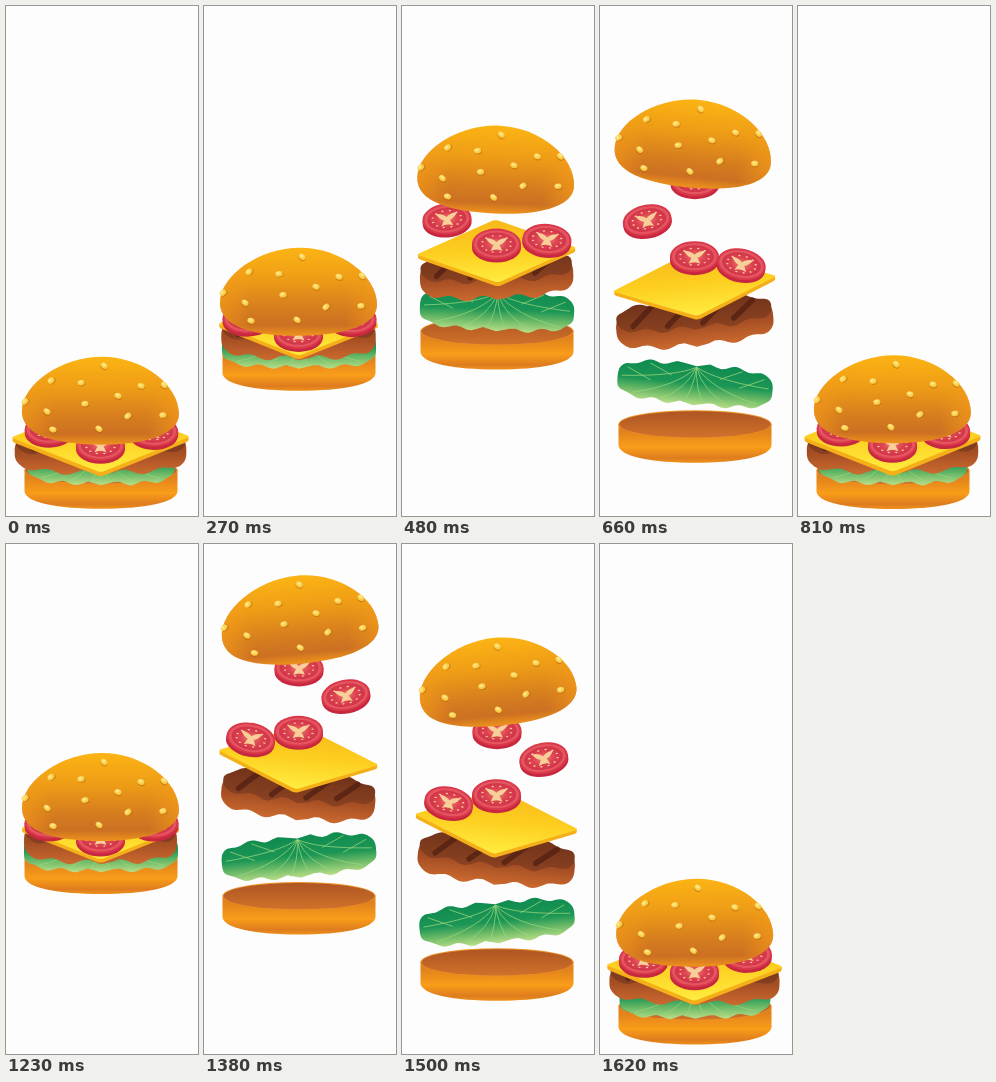
These frames come from a looping animation (192x510 px, 1.65 s). An HTML page:

```html
<!DOCTYPE html>
<html lang="en">
<head>
<meta charset="utf-8">
<title>Bouncing burger</title>
<style>
html, body { margin: 0; width: 100%; height: 100%; overflow: hidden; background: #fdfdfd; }
svg { display: block; width: 100vw; height: 100vh; }
</style>
</head>
<body>
<svg viewBox="0 0 192 510">
  <defs>
    <linearGradient id="crown" x1="0" y1="0" x2="0" y2="1">
      <stop offset="0" stop-color="#fcb414"/><stop offset=".35" stop-color="#ee9d16"/>
      <stop offset=".7" stop-color="#d57c1f"/><stop offset=".88" stop-color="#cc7022"/>
      <stop offset="1" stop-color="#ee931c"/>
    </linearGradient>
    <linearGradient id="crownEdge">
      <stop offset="0" stop-color="#f79d18" stop-opacity=".6"/><stop offset=".2" stop-color="#f79d18" stop-opacity="0"/>
      <stop offset=".8" stop-color="#f79d18" stop-opacity="0"/><stop offset="1" stop-color="#f79d18" stop-opacity=".6"/>
    </linearGradient>
    <linearGradient id="heel" x1="0" y1="0" x2="0" y2="1">
      <stop offset=".2" stop-color="#e2821c"/><stop offset=".6" stop-color="#f99d19"/>
      <stop offset=".88" stop-color="#de7c1e"/><stop offset="1" stop-color="#ee911c"/>
    </linearGradient>
    <linearGradient id="heelTop" x1="0" y1="0" x2="0" y2="1">
      <stop offset="0" stop-color="#ae5522"/><stop offset="1" stop-color="#d0722b"/>
    </linearGradient>
    <linearGradient id="leaf" x1="0" y1="0" x2="0" y2="1">
      <stop offset="0" stop-color="#0f8b50"/><stop offset=".48" stop-color="#1c9655"/>
      <stop offset=".72" stop-color="#68b866"/><stop offset="1" stop-color="#bade88"/>
    </linearGradient>
    <linearGradient id="meat" x1="0" y1="0" x2="0" y2="1">
      <stop offset="0" stop-color="#70321a"/><stop offset="1" stop-color="#8a4221"/>
    </linearGradient>
    <linearGradient id="meatSide" x1="0" y1="0" x2="0" y2="1">
      <stop offset=".5" stop-color="#a24c23"/><stop offset="1" stop-color="#cc6a2f"/>
    </linearGradient>
    <linearGradient id="cheeseTop" x1="0" y1="0" x2="0" y2="1">
      <stop offset="0" stop-color="#f7b91a"/><stop offset=".5" stop-color="#fdcf20"/>
      <stop offset="1" stop-color="#ffec3f"/>
    </linearGradient>
    <radialGradient id="flesh">
      <stop offset="0" stop-color="#ee7a74"/><stop offset=".55" stop-color="#dc4350"/>
      <stop offset="1" stop-color="#d2344a"/>
    </radialGradient>
    <radialGradient id="seedFill" cx=".4" cy=".35">
      <stop offset="0" stop-color="#ffee9c"/><stop offset="1" stop-color="#f9c940"/>
    </radialGradient>
    <g id="slice">
      <path d="M-24.5 0v4a24.5 14.5 0 0 0 49 0v-4z" fill="#c7283f"/>
      <ellipse rx="24.5" ry="15.5" fill="#d9384b"/>
      <ellipse rx="22.5" ry="13.6" fill="#e5555f"/>
      <ellipse rx="19.5" ry="11.4" fill="url(#flesh)"/>
      <path d="M-11-6Q-4-6 0-2Q4-6 11-6Q7 0 3 1L6 7Q0 4-6 7L-3 1Q-7 0-11-6Z" fill="#f8cf98"/>
      <g id="pips" fill="#f7cf9c"></g>
    </g>
  </defs>
  <g id="heelBun">
    <path d="M-76.5-39V-18C-76.5-6-43 0 0 0S76.5-6 76.5-18V-39Z" fill="url(#heel)"/>
    <ellipse cy="-38.5" rx="76.5" ry="14" fill="#ec9128"/>
    <ellipse cy="-38.3" rx="75.5" ry="13.2" fill="url(#heelTop)"/>
  </g>
  <g id="lettuce"></g>
  <g id="patty"></g>
  <g id="cheese">
    <path d="M-80 0L0 31L80 0V3Q80 4 78 5L3 35Q0 36-3 35L-78 5Q-80 4-80 3Z" fill="#f5b019"/>
    <path d="M-79-1L-3-31Q0-32 3-31L79-1Q81 0 79 1L3 31Q0 32-3 31L-79 1Q-81 0-79-1Z" fill="url(#cheeseTop)"/>
  </g>
  <use href="#slice" id="back"/>
  <use href="#slice" id="high"/>
  <use href="#slice" id="front"/>
  <use href="#slice" id="low"/>
  <g id="crownBun"></g>
</svg>
<script>
const LOOP = 1650, HALF = LOOP / 2, STEP = 30;
const el = id => document.getElementById(id);
const mix = (a, b, k) => a + (b - a) * k;
const clamp = v => Math.max(0, Math.min(1, v));

// Smooth interpolation through [time, value] pairs without overshoot
function track(keys) {
  const slope = keys.slice(1).map((k, i) => (k[1] - keys[i][1]) / (k[0] - keys[i][0]));
  const tan = keys.map((k, i) => {
    const a = slope[i - 1] || 0, b = slope[i] || 0;
    return a * b > 0 ? 2 * a * b / (a + b) : 0;
  });
  return t => {
    let i = 0;
    while (i < keys.length - 2 && t >= keys[i + 1][0]) i++;
    const [t0, a] = keys[i], [t1, b] = keys[i + 1];
    const d = t1 - t0, s = (t - t0) / d, r = 1 - s;
    return a * (1 + 2 * s) * r * r + b * s * s * (3 - 2 * s) + d * (tan[i] * s * r * r - tan[i + 1] * s * s * r);
  };
}

const height = track([[0, 152], [165, 148], [270, 143], [405, 141], [540, 357], [580, 396], [660, 364], [780, 166], [825, 152]]);
const wide = track([[0, 1.1], [165, 1.06], [270, .99], [405, .98], [660, 1.01], [780, 1.09], [825, 1.1]]);
const leafWide = track([[0, .96], [165, 1.06], [270, 1], [405, 1], [660, 1.01], [780, .98], [825, .96]]);

// Rounded slab outline with a rippled edge
function slab(rx, ry, bend, ripple, waves, cy = 0) {
  const pts = [];
  for (let i = 0; i < 144; i++) {
    const a = i / 144 * 2 * Math.PI, c = Math.cos(a), s = Math.sin(a);
    const x = Math.sign(c) * Math.abs(c) ** bend * rx;
    const y = Math.sign(s) * Math.abs(s) ** bend * ry + ripple * Math.sin(x / rx * waves + (s > 0 ? 1 : 2.4)) * Math.abs(s);
    pts.push(x.toFixed(1) + ' ' + (y + cy).toFixed(1));
  }
  return 'M' + pts.join('L') + 'Z';
}

const veins = [-1, 1].map(d => `M0-17Q${d * 20}-6 ${d * 73}-2M0-17Q${d * 18} 4 ${d * 62} 14M0-17Q${d * 8} 6 ${d * 34} 18M0-17Q${d} 4 ${d * 10} 19M${d * 24}-7L${d * 46}-17M${d * 44} 0L${d * 68}-11`).join('');
el('lettuce').innerHTML = `<path d="${slab(77, 19.5, .56, 2, 17)}" fill="url(#leaf)"/>
  <path d="${veins}" fill="none" stroke="#9ad67c" stroke-width=".9" opacity=".8"/>`;

el('patty').innerHTML = `<path d="${slab(78, 21, .6, 2.6, 14, 3)}" fill="url(#meatSide)"/>
  <path d="${slab(77, 14, .64, 2.6, 14, -7)}" fill="url(#meat)"/>
  <path d="M-61 0L-42-17M-27 3L-4-17M8 3L31-17M39 1L59-15" stroke="#521f11" stroke-width="5.5" stroke-linecap="round" opacity=".75"/>`;

let pips = '';
for (let i = 0; i < 12; i++) {
  const a = (i + .5) / 12 * 2 * Math.PI;
  pips += `<ellipse cx="${14.5 * Math.cos(a)}" cy="${8.4 * Math.sin(a)}" rx="1.2" ry=".7"/>`;
}
el('pips').innerHTML = pips;

const dome = 'M-79 55C-79 28-40 0 1 0S78 28 78 57C78 78 44 88 0 88S-79 80-79 55Z';
const seeds = [[3, 9], [-50, 24], [-20, 26], [40, 29], [63, 28], [-76, 45], [-16, 47], [17, 39], [-54, 55], [27, 59], [62, 58], [-48, 73], [-2, 72]];
el('crownBun').innerHTML = `<path d="${dome}" fill="url(#crown)"/><path d="${dome}" fill="url(#crownEdge)"/>` +
  seeds.map(([x, y], i) => `<g transform="translate(${x} ${y}) rotate(${[35, -40, -10, 15][i % 4]})">
    <ellipse cx=".5" cy="1" rx="3.9" ry="2.9" fill="#b0620f" opacity=".5"/>
    <ellipse rx="3.7" ry="2.8" fill="url(#seedFill)"/></g>`).join('');

function place(id, x, y, turn = 0, sx = 1, sy = 1) {
  el(id).setAttribute('transform', `translate(${x} ${y}) rotate(${turn}) scale(${sx} ${sy})`);
}

function draw(time) {
  const t = Math.floor(time % LOOP / STEP) * STEP;
  const second = t >= HALF, dir = second ? -1 : 1;
  let p = t % HALF;
  if (second) p -= 15 * clamp((p - 300) / 300);

  const base = 503 - 76.5 * (1 - Math.cos(2 * Math.PI * (p + 12) / HALF));
  const h = height(p), open = (h - 141) / 223;
  const w = wide(p), tilt = 5.4 * open * dir;
  const at = (shut, apart) => base - mix(shut, apart, open);
  const k = clamp(open), spin = 11 * open;
  const left = mix(43, 47, k), right = mix(148, 141.5, k);

  place('heelBun', 95, base);
  place('lettuce', 95, at(43, 78.5), tilt, leafWide(p));
  place('patty', 94.5, at(56, 142), -tilt, w);
  place('cheese', 94.5, at(66, 179), -tilt, w, w);
  place('back', 95, at(85, second ? 270 : 282));
  place('high', second ? right : left, at(71, 242.5), -spin);
  place('front', 94.5, at(56, 206));
  place('low', second ? left : right, at(71, 198.5), spin);

  // The crown turns about its middle
  const a = tilt * Math.PI / 180;
  place('crownBun', 95 + 45 * Math.sin(a) - .7 * dir * k, base - h + 45 * (1 - Math.cos(a)) + k, tilt);
}

function loop(now) {
  draw(now);
  requestAnimationFrame(loop);
}
draw(0);
requestAnimationFrame(loop);
</script>
</body>
</html>
```
